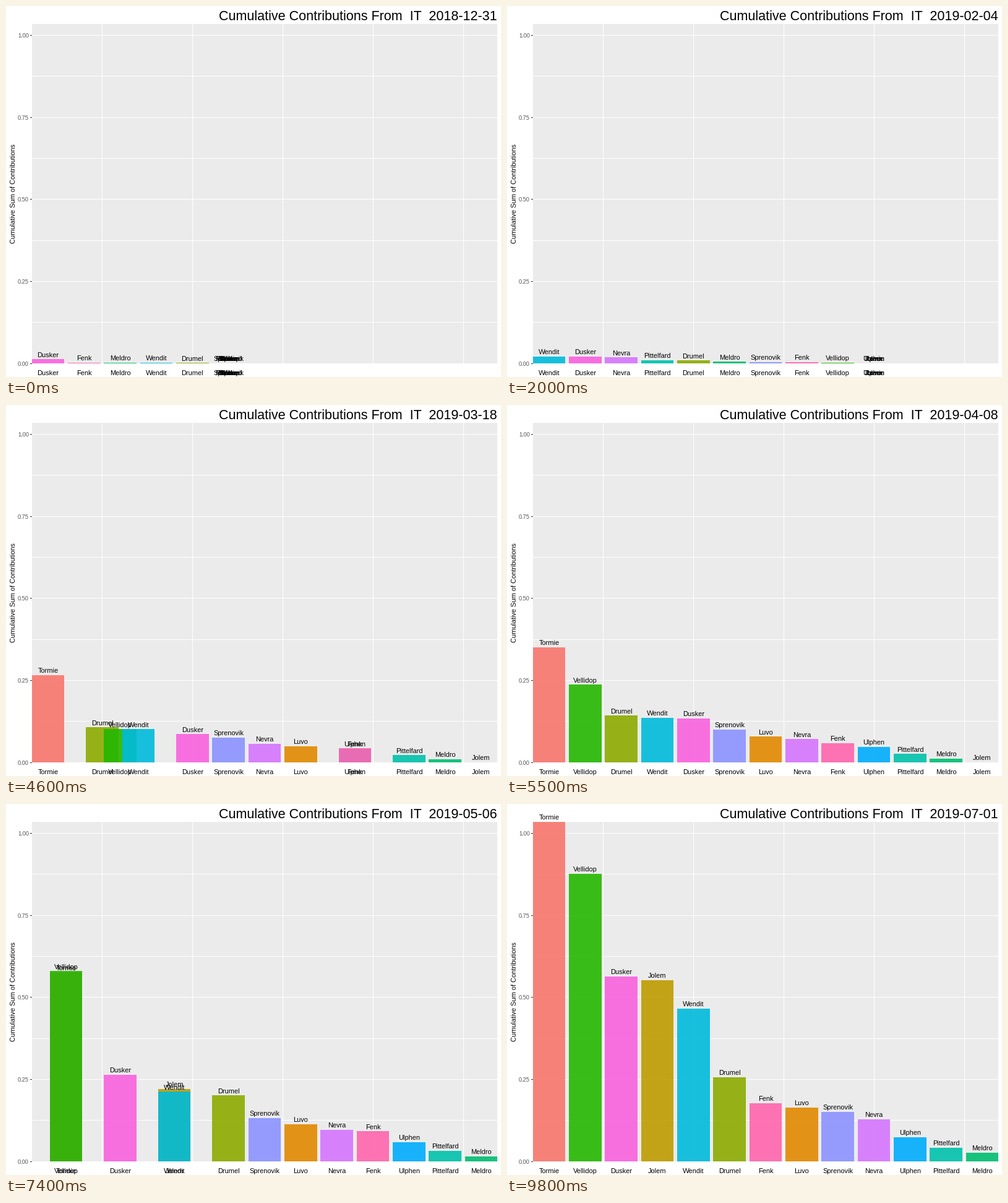
Write a matplotlib script that moves like this. It is 800 by 600 pixels and loops after 10000 ms.

```python
import numpy as np
import matplotlib.pyplot as plt
from matplotlib.animation import FuncAnimation
from matplotlib.patches import Rectangle

plt.rcParams["font.family"] = "Liberation Sans"
plt.rcParams["text.hinting"] = "native"

W, H, DPI = 800, 600, 100
LEFT, RIGHT, TOP, BASE = 41.7, 794.3, 29, 578
STEP = (RIGHT - LEFT) / 12.9      # pixels per rank
UNIT = 530.5                      # pixels per 1.00 on the y axis
BAR = 0.9 * STEP
LAST = 25                         # week in which the sums stop growing

# Frame at which each week settles; the pace picks up near the end.
ARRIVALS = [*range(-1, 88, 4), *range(89, 99, 3)]


def growth(end, launch, power=1.0, settle=1.0, opening=0.0, seed=0.0):
    """Cumulative sum by week, rising to `end`.

    power > 1 starts slowly, settle > 1 levels off and settle < 1 surges late.
    opening is the share reached at launch, seed the sum held before it.
    """
    def at(week):
        if week < launch:
            return seed
        t = min((week - launch) / (LAST - launch), 1)
        rise = (1 - (1 - t) ** settle) ** power
        return max(seed, end * (opening + (1 - opening) * rise))
    return at


SERIES = {
    "Tormie": growth(1.035, 8, power=1.68, opening=0.2),
    "Luvo": growth(0.164, 10, power=0.45, settle=0.7),
    "Jolem": growth(0.5523, 17, power=3.5, settle=3, opening=0.345),
    "Drumel": growth(0.2564, 4.3, power=1.1, settle=1.4, seed=0.0016),
    "Vellidop": growth(0.8765, 4, power=4.1, settle=2, opening=0.002),
    "Meldro": growth(0.0264, 0, settle=0.6, opening=0.07),
    "Pittelfard": growth(0.0415, 2, power=0.72),
    "Wendit": growth(0.4656, 3, settle=0.5, seed=0.0017),
    "Ulphen": growth(0.0735, 9, opening=0.49),
    "Sprenovik": growth(0.1508, 4.5, power=1.2, settle=2),
    "Nevra": growth(0.128, 2, settle=1.1),
    "Dusker": growth(0.5636, 0, power=2.6, opening=0.022),
    "Fenk": growth(0.1772, 4.4, power=0.95, settle=0.6, seed=0.0019),
}


def hue_color(hue, chroma=100, light=65):
    """Colour of equal lightness around the CIE LUV hue circle."""
    angle = np.radians(hue)
    u = chroma * np.cos(angle) / (13 * light) + 0.1978
    v = chroma * np.sin(angle) / (13 * light) + 0.4683
    y = ((light + 16) / 116) ** 3
    x, z = 9 * y * u / (4 * v), y * (12 - 3 * u - 20 * v) / (4 * v)
    rgb = np.array([3.2405 * x - 1.5371 * y - 0.4985 * z,
                    -0.9693 * x + 1.8760 * y + 0.0416 * z,
                    0.0556 * x - 0.2040 * y + 1.0572 * z])
    rgb = np.clip(rgb, 0, 1)
    return np.where(rgb > 0.0031308,
                    np.clip(1.055 * rgb ** (1 / 2.4) - 0.055, 0, 1),
                    12.92 * rgb)


def ranks(values):
    """Rank from the largest; ties share the smallest rank."""
    return np.array([1 + np.sum(values > v) for v in values])


SUMS = [np.array([at(week) for at in SERIES.values()])
        for week in range(len(ARRIVALS))]
RANKS = [ranks(s) for s in SUMS]


def rank_x(rank):
    return LEFT + (rank - 0.55) * STEP


def value_y(value):
    return BASE - value * UNIT


fig = plt.figure(figsize=(W / DPI, H / DPI), dpi=DPI, facecolor="white")
ax = fig.add_axes([0, 0, 1, 1])
ax.set_xlim(0, W)
ax.set_ylim(H, 0)
ax.axis("off")


def box(x, y, w, h, color, z, **kw):
    return ax.add_patch(Rectangle((x, y), w, h, fc=color, lw=0, zorder=z, **kw))


def label(x, y, text, px, color="black", **kw):
    return ax.text(x, y, text, fontsize=px * 72 / DPI, color=color, zorder=5, **kw)


# Panel, grid and axis
box(LEFT, TOP, RIGHT - LEFT, BASE - TOP, "#EBEBEB", 0)
for r in np.arange(2.5, 13, 2.5):
    box(round(rank_x(r)), TOP, 1, BASE - TOP, "white", 1)
for v in np.arange(0.125, 1.01, 0.125):
    box(LEFT, int(value_y(v)), RIGHT - LEFT, 1, "white", 1)
for v in np.arange(0, 1.01, 0.25):
    y = int(value_y(v))
    box(39, y, 3, 1, "#333333", 1)
    label(37, y + 4, f"{v:.2f}", 9.2, "#4D4D4D", ha="right", va="baseline")
label(12, 303.5, "Cumulative Sum of Contributions", 11,
      rotation=90, ha="center", va="center")
title = label(794, 23, "", 21.55, ha="right", va="baseline")

bars, tops, feet = [], [], []
for i, name in enumerate(SERIES):
    color = hue_color(15 + 360 * i / len(SERIES))
    bars.append(box(0, BASE, BAR, 0, color, 2 + i / 100, alpha=0.9))
    tops.append(label(0, 0, name, 11, ha="center", va="baseline"))
    feet.append(label(0, 597, name, 11, ha="center", va="baseline"))


def draw(frame):
    week = int(np.searchsorted(ARRIVALS, frame, side="right")) - 1
    values, places = SUMS[week], RANKS[week]
    if frame + 1 in ARRIVALS:     # halfway to the next week
        values = (values + SUMS[week + 1]) / 2
        places = (places + RANKS[week + 1]) / 2

    date = np.datetime64("2018-12-31") + 7 * week
    title.set_text(f"Cumulative Contributions From  IT  {date}")

    for bar, top, foot, value, place in zip(bars, tops, feet, values, places):
        x, y = rank_x(place), value_y(value)
        bar.set_bounds(x - BAR / 2, y, BAR, BASE - y)
        bar.set_visible(value > 0)
        top.set_position((x, y - 3.6))
        foot.set_x(x)
    return [title, *bars, *tops, *feet]


anim = FuncAnimation(fig, draw, frames=100, interval=100,
                     repeat=True, repeat_delay=0, blit=False)
plt.show()
```
